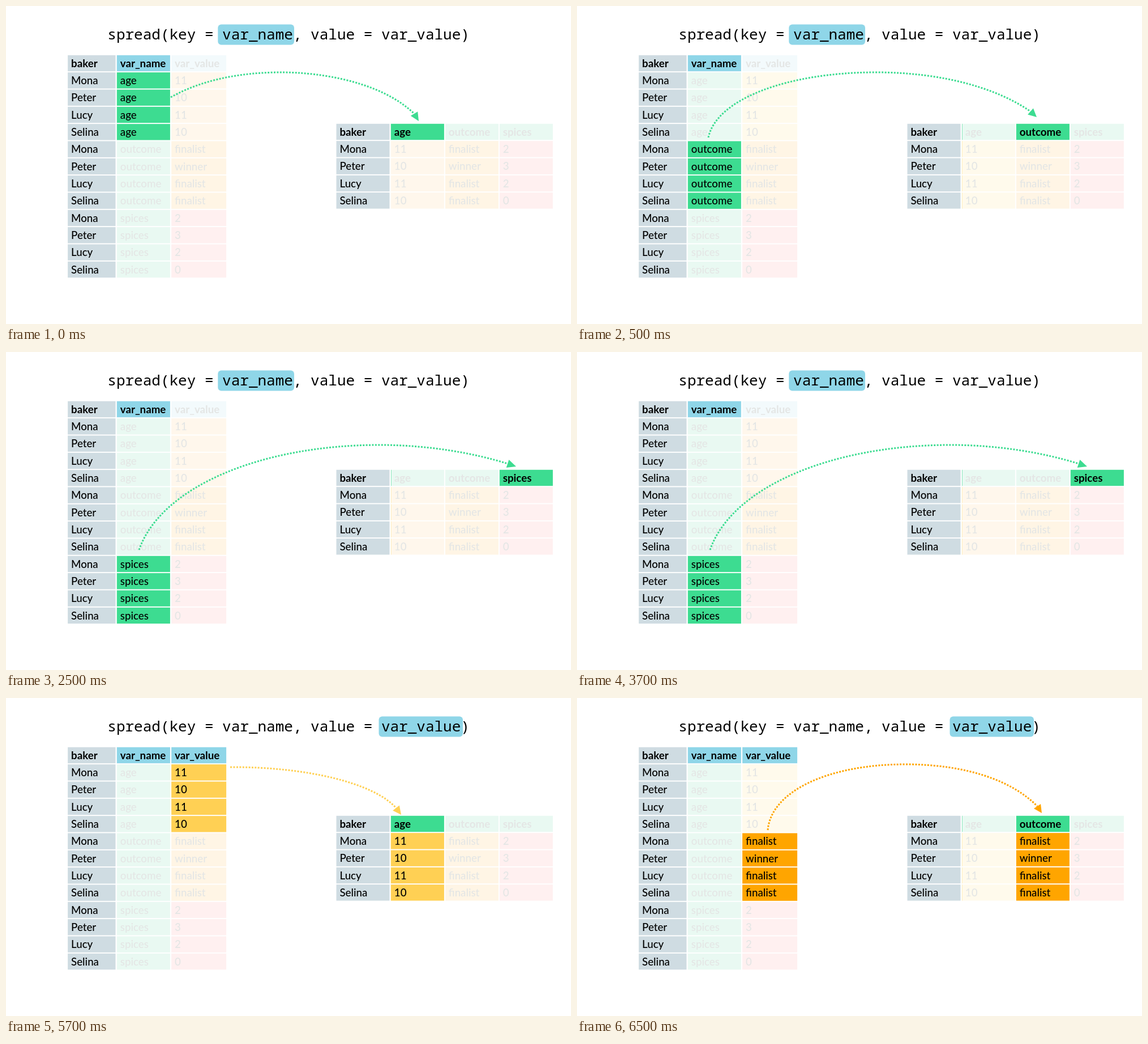
An HTML page for the animation above (8 s loop, 998x561 px).

```html
<!DOCTYPE html>
<html lang="en">
<head>
<meta charset="utf-8">
<title>Spreading a table</title>
<style>
  html, body { margin: 0; width: 100%; height: 100%; overflow: hidden; background: #fff; }
  svg { display: block; width: 100vw; height: 100vh; }
  text { white-space: pre; }
  .cell { font: 500 18.7px Lato, "Open Sans", sans-serif; }
  .head { font-weight: 700; }
  .dim { fill: #e4e6e5; }
  .code { font: 500 26px "Noto Sans Mono", "DejaVu Sans Mono", monospace; }
  .dots { fill: none; stroke-width: 3; stroke-dasharray: 3 2.4; }
</style>
</head>
<body>
<svg id="stage" viewBox="0 0 998 561"></svg>
<script>
const stage = document.getElementById('stage');
const NS = 'http://www.w3.org/2000/svg';
const LOOP = 8000, ROW = 30.33, TOP = 86.8, RIGHT_TOP = 207.8, HEIGHT = 28.4;

const GREY = '#cfdce2', BLUE = '#8fd6e8', PALE_BLUE = '#f3fafc';
const GREEN = '#3ddc91', PALE_GREEN = '#e9f9f2';

const people = ['Mona', 'Peter', 'Lucy', 'Selina'];
const groups = [
  { key: 'age', values: ['11', '10', '11', '10'], full: '#ffd054', x: 679.8 },
  { key: 'outcome', values: ['finalist', 'winner', 'finalist', 'finalist'], full: '#ffa500', pale: '#fff5e5', x: 775.8 },
  { key: 'spices', values: ['2', '3', '2', '0'], pale: '#fff0f0', x: 871.8 }
];

// Each step lights one group, either its key or its values.
const steps = [
  { at: 0, group: 0, pale: '#fff7ec', color: GREEN, base: [721, 190], tip: [729, 203],
    path: 'M291 161C350 128 420 117 487 117S662 133 721 190' },
  { at: 500, group: 1, pale: '#fffaec', color: GREEN, base: [801, 186], tip: [812, 196],
    path: 'M232 232C246 165 370 117 528 117C650 117 745 147 801 186' },
  { at: 2500, group: 2, pale: '#fff7ec', color: GREEN, base: [886, 197], tip: [901, 202],
    path: 'M235 349C274 238 450 164 660 164C745 164 825 178 886 197' },
  { at: 4500, group: 0, value: true, pale: '#fffaec', color: '#ffd054', base: [689, 194], tip: [698, 206],
    path: 'M396 122C530 121 650 150 689 194' },
  { at: 6500, group: 1, value: true, pale: '#fffaec', color: '#ffa500', base: [813, 191], tip: [821, 203],
    path: 'M337 233C343 164 445 117 580 117C690 117 770 147 813 191' }
];

function add(parent, tag, attrs, text) {
  const el = document.createElementNS(NS, tag);
  for (const name in attrs) el.setAttribute(name, attrs[name]);
  if (text) el.textContent = text;
  return parent.appendChild(el);
}

function cell(g, x, y, width, fill, label, lit, head) {
  add(g, 'rect', { x, y, width, height: HEIGHT, fill });
  add(g, 'text', {
    x: x + 6, y: y + 20.9,
    class: 'cell' + (head ? ' head' : '') + (lit ? '' : ' dim')
  }, label);
}

function leftTable(g, step) {
  const { group, value, pale } = step;
  cell(g, 109.1, TOP, 84.4, GREY, 'baker', true, true);
  cell(g, 195.8, TOP, 94.1, BLUE, 'var_name', true, true);
  cell(g, 292.1, TOP, 97, value ? BLUE : PALE_BLUE, 'var_value', value, true);
  groups.forEach((item, k) => people.forEach((name, i) => {
    const y = TOP + ROW * (1 + k * 4 + i);
    const key = !value && k === group, val = value && k === group;
    cell(g, 109.1, y, 84.4, GREY, name, true);
    cell(g, 195.8, y, 94.1, key ? GREEN : PALE_GREEN, item.key, key);
    cell(g, 292.1, y, 97, val ? item.full : item.pale || pale, item.values[i], val);
  }));
}

function rightTable(g, step) {
  const { group, value, pale } = step;
  cell(g, 583.5, RIGHT_TOP, 94, GREY, 'baker', true, true);
  people.forEach((name, i) => cell(g, 583.5, RIGHT_TOP + ROW * (i + 1), 94, GREY, name, true));
  groups.forEach((item, k) => {
    const on = k === group;
    cell(g, item.x, RIGHT_TOP, 94.1, on ? GREEN : PALE_GREEN, item.key, on, true);
    item.values.forEach((v, i) => {
      const lit = on && value;
      cell(g, item.x, RIGHT_TOP + ROW * (i + 1), 94.1, lit ? item.full : item.pale || pale, v, lit);
    });
  });
  // thin edge left by the lit age column
  if (group) {
    for (let i = 0; i < 5; i++) {
      add(g, 'rect', { x: 680, y: RIGHT_TOP + ROW * i, width: 1, height: HEIGHT, fill: i ? '#ffeebf' : '#8ee8bf' });
    }
  }
}

function arrow(g, { path, base: [bx, by], tip: [tx, ty], color }) {
  const len = Math.hypot(tx - bx, ty - by);
  const nx = (by - ty) / len * 7.3, ny = (tx - bx) / len * 7.3;
  add(g, 'path', { d: path, class: 'dots', stroke: color });
  add(g, 'path', { d: `M${tx} ${ty}L${bx + nx} ${by + ny}L${bx - nx} ${by - ny}Z`, fill: color });
}

const scenes = steps.map(step => {
  const g = add(stage, 'g', {});
  const [x, width] = step.value ? [658.5, 148.5] : [374.3, 134.7];
  add(g, 'rect', { x, y: 32.5, width, height: 36, rx: 6, fill: BLUE });
  add(g, 'text', { x: 179.3, y: 59, class: 'code' }, 'spread(key = var_name, value = var_value)');
  leftTable(g, step);
  rightTable(g, step);
  arrow(g, step);
  return g;
});

function draw() {
  const t = performance.now() % LOOP;
  const now = steps.filter(s => s.at <= t).length - 1;
  scenes.forEach((g, i) => g.setAttribute('visibility', i === now ? 'visible' : 'hidden'));
  requestAnimationFrame(draw);
}
draw();
</script>
</body>
</html>
```
